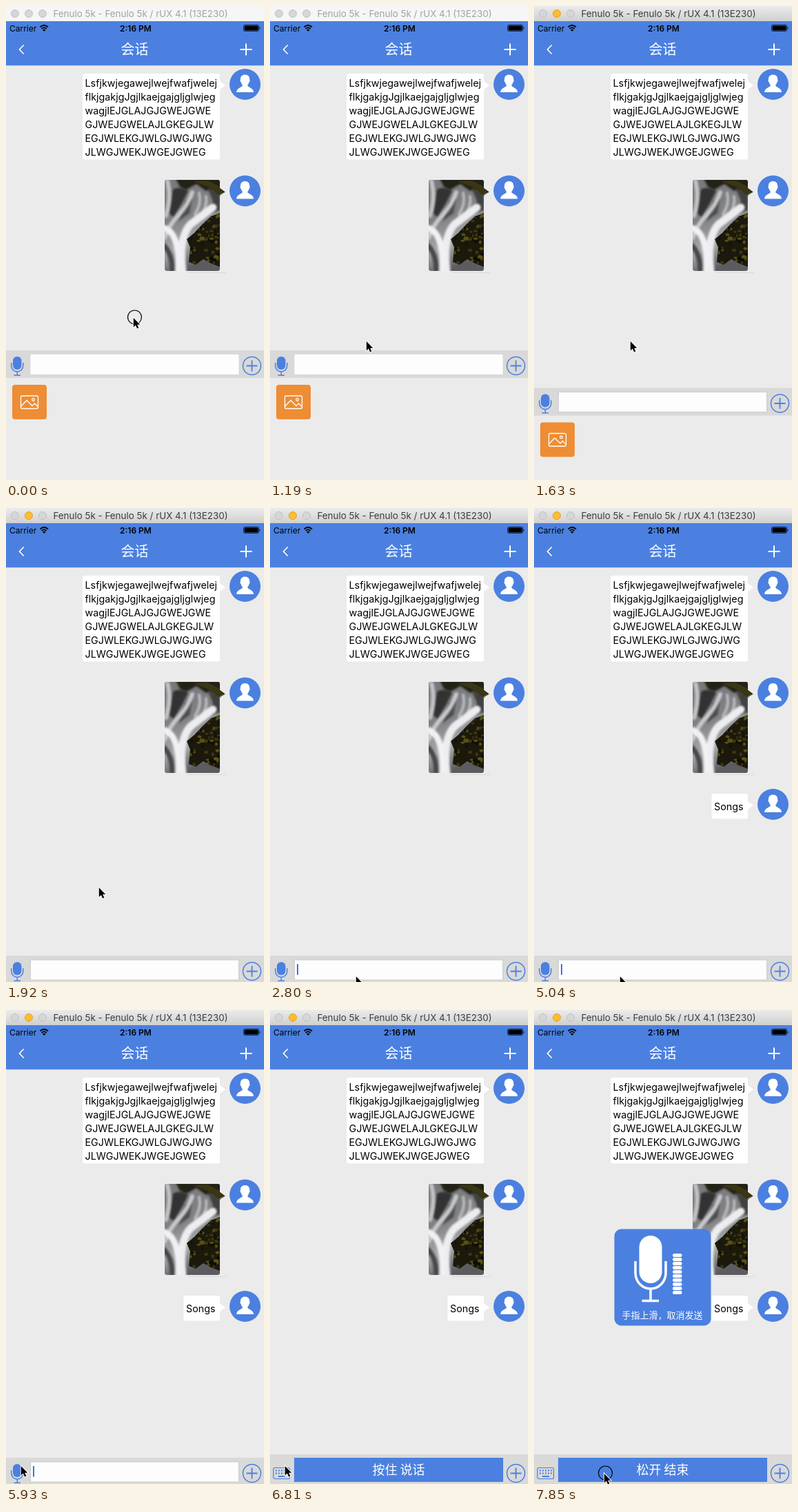
These frames come from a looping animation (374x687 px, 8000 ms). An HTML page:

```html
<!DOCTYPE html>
<html lang="zh-CN">
<head>
<meta charset="utf-8">
<title>Chat</title>
<style>
  html, body { margin: 0; width: 100%; height: 100%; overflow: hidden; background: #ebebeb; }
  svg { display: block; width: 374px; height: 687px; }
  text { font-family: Inter, "Noto Sans CJK SC", "Noto Sans CJK", sans-serif; white-space: pre; }
  .mid { text-anchor: middle; }
  .blue { fill: #4b80e0; }
  .white { fill: #fff; }
  .line { fill: none; stroke: #4b80e0; stroke-width: 1.5; }
  .wline { fill: none; stroke: #fff; }
  .msg { font-size: 14.3px; }
  .edit { font: 12px "Liberation Sans", Arial, sans-serif; }
  .cjk { font-family: "Noto Sans CJK SC", "Noto Sans CJK", sans-serif; fill: #fff; }
  .dot { fill: #d6d6d6; stroke: #c2c2c2; }
  #title { font-size: 13.4px; fill: #a2a2a2; }
  #chrome { fill: #f6f6f6; }
  .active #chrome { fill: url(#steel); }
  .active #title { fill: #3d3d3d; }
  .active #amber { fill: #fdbd2e; stroke: #e0a033; }
  .active .field { stroke: #cbcbcb; }
</style>
</head>
<body>
<svg id="stage" viewBox="0 0 374 687">
  <defs>
    <linearGradient id="steel" x2="0" y2="1">
      <stop stop-color="#ebebeb"/><stop offset="1" stop-color="#d0d0d0"/>
    </linearGradient>
    <linearGradient id="mist" x2="0.3" y2="1">
      <stop stop-color="#77787b"/><stop offset=".45" stop-color="#808184"/>
      <stop offset=".75" stop-color="#a9a9ac"/><stop offset="1" stop-color="#5c5c60"/>
    </linearGradient>
    <filter id="soft"><feGaussianBlur stdDeviation="1.500"/></filter>
    <clipPath id="photo">
      <path d="M233 252H307a3 3 0 0 1 3 3V264L317.500 269.500L310 275V381a3 3 0 0 1-3 3H233a3 3 0 0 1-3-3V255a3 3 0 0 1 3-3z"/>
    </clipPath>
    <clipPath id="cliff">
      <path d="M262 338L274 328L284 317L297 305L310 300V378L297 373L286 367L275 375L265 371L267 350z"/>
    </clipPath>
    <g id="avatar">
      <circle r="22.500" class="blue"/>
      <path class="white" d="M0-14C4.500-14 6.800-11 6.600-7C7.500-6 6.800-3.500 5.800-3C5-.5 4 1 3.500 1.500C4.500 5 12 4.500 12.500 11.500H-12.500C-12 4.500-4.500 5-3.500 1.500C-4 1-5-.5-5.800-3C-6.800-3.500-7.500-6-6.600-7C-6.800-11-4.500-14 0-14z"/>
    </g>
  </defs>

  <rect width="374" height="687" fill="#ebebeb"/>

  <!-- messages -->
  <g class="white">
    <rect x="111" y="98" width="199" height="124.500" rx="3"/>
    <path d="M309.500 108.500L318 115L309.500 121.500z"/>
  </g>
  <g id="letter"></g>
  <use href="#avatar" x="346.500" y="113.500"/>

  <g clip-path="url(#photo)">
    <rect x="230" y="252" width="90" height="132" fill="url(#mist)"/>
    <g filter="url(#soft)">
      <path d="M246 250H320V274L304 264L290 268L276 258L262 266L252 262z" fill="#232216"/>
      <path d="M242 266Q252 260 264 268L256 284L243 306L236 300z" fill="#303130"/>
      <path d="M292 264L310 270V296L296 300L300 282z" fill="#414140"/>
      <path d="M260 282L270 278L266 300L250 312z" fill="#4c4d4d"/>
    </g>
    <path d="M272 254L292 253L308 261L317 269L308 274L294 263z" fill="#3a3614"/>
    <g filter="url(#soft)" fill="none" stroke-linecap="round">
      <path d="M234 254Q240 276 232 304" stroke="#c4c4c7" stroke-width="6"/>
      <path d="M270 270Q264 288 250 303T230 336" stroke="#c9c9cc" stroke-width="6"/>
      <path d="M280 271Q284 286 274 302M290 276Q292 290 284 300" stroke="#bcbcc0" stroke-width="4"/>
      <path d="M300 292Q284 304 268 316Q250 334 256 384" stroke="#ededf0" stroke-width="11"/>
      <path d="M230 322Q252 330 250 384" stroke="#f1f1f4" stroke-width="9"/>
      <path d="M230 348Q242 362 241 386" stroke="#47474b" stroke-width="7"/>
    </g>
    <g id="rock" clip-path="url(#cliff)">
      <rect x="260" y="296" width="52" height="84" fill="#1b190c"/>
    </g>
  </g>
  <path d="M263 386.500H319" stroke="#d9d9d9"/>
  <use href="#avatar" x="346.500" y="268"/>

  <g id="reply">
    <rect x="257.500" y="414" width="52.500" height="36.500" rx="3" class="white"/>
    <path d="M309.500 425L318 431L309.500 437.500z" class="white"/>
    <text x="261" y="438" class="msg">Songs</text>
    <use href="#avatar" x="346.500" y="429.500"/>
  </g>

  <!-- input bar and its attachment panel -->
  <g id="bar">
    <g id="typing">
      <rect y="499" width="374" height="40" fill="#d9d9d9"/>
      <rect class="field" x="35.500" y="505" width="302" height="29" fill="#fdfdfd"/>
      <rect x="10" y="508" width="12.500" height="19" rx="6.200" class="blue"/>
      <path class="line" d="M7.800 517V521.500a8.500 8.500 0 0 0 17 0V517M16.300 530V535M11.500 535.300H21"/>
    </g>
    <g id="voice">
      <rect y="494" width="374" height="45" fill="#d9d9d9"/>
      <rect x="35" y="499" width="303" height="35" class="blue"/>
      <text id="hold" class="cjk mid" x="186.500" y="523" font-size="18"></text>
      <rect class="line" x="5" y="513.500" width="23.500" height="16" rx="2" style="stroke-width:1.200"/>
      <g id="keys" class="blue"></g>
    </g>
    <circle class="line" cx="356.500" cy="521.500" r="13"/>
    <path class="line" d="M348.500 521.500H364.500M356.500 513.500V529.500" style="stroke-width:1.800"/>
    <rect x="9" y="549" width="50" height="50" rx="4" fill="#ee8d34"/>
    <g class="wline" stroke-width="1.300">
      <rect x="21.500" y="565" width="25" height="18.500" rx="2"/>
      <path d="M22 580L30 571.500L38 579.500L41.500 576L46.500 581"/>
      <circle cx="39.500" cy="570.500" r="1.800"/>
    </g>
  </g>

  <g id="editor">
    <rect id="mark" x="38" y="661" height="17" fill="#c5d8f1"/>
    <text id="draft" class="edit" x="40" y="674"></text>
    <rect id="caret" y="661" width="2" height="15.500" fill="#3f73dd"/>
    <g id="hint">
      <path d="M40 641.500H83a9 9.500 0 0 1 0 19H37.500V644q0-2.500 2.500-2.500z" fill="#fff" stroke="#bdbdbd"/>
      <text class="edit" x="40" y="655.500" fill="#2f76df">Songs</text>
      <path d="M78 647.500L85 654.500M85 647.500L78 654.500" stroke="#b5b5b5"/>
    </g>
  </g>

  <!-- recording panel -->
  <g id="record">
    <rect x="116.500" y="317.500" width="140" height="140" rx="10" class="blue"/>
    <rect x="152.500" y="327" width="33" height="69" rx="16.500" class="white"/>
    <path class="wline" stroke-width="3.500" d="M147 364V381a22 23 0 0 0 44 0V364M169 404V421M156.500 421.500H181"/>
    <g id="levels" class="white"></g>
    <text class="cjk mid" x="186" y="447" font-size="13">手指上滑，取消发送</text>
  </g>

  <!-- window chrome, status and navigation -->
  <rect id="chrome" width="374" height="22"/>
  <circle class="dot" cx="13" cy="11" r="5.500"/>
  <circle class="dot" id="amber" cx="33" cy="11" r="5.500"/>
  <circle class="dot" cx="53" cy="11" r="5.500"/>
  <text id="title" class="mid" x="195" y="16">Fenulo 5k - Fenulo 5k / rUX 4.1 (13E230)</text>
  <rect y="22" width="374" height="64" class="blue"/>
  <rect y="86" width="374" height=".500" fill="#a9b6cf"/>
  <text x="5" y="36.500" font-size="12">Carrier</text>
  <path d="M49.500 30.500Q55.300 25.500 61 30.500M51.700 33Q55.300 29.800 58.800 33" fill="none" stroke="#000" stroke-width="1.700"/>
  <path d="M53 34.500Q55.300 32.800 57.600 34.500L55.300 37z"/>
  <text class="mid" x="188" y="36.500" font-size="12" font-weight="600">2:16 PM</text>
  <rect x="344.500" y="27.500" width="22" height="9" rx="2" fill="none" stroke="#000" stroke-width=".700"/>
  <rect x="345.500" y="28.500" width="20" height="7" rx="1"/>
  <path d="M367.500 30.500q2 1.600 0 3.200z"/>
  <path class="wline" stroke-width="1.600" d="M25.700 56.500L19.500 63L25.700 69.500"/>
  <text class="cjk mid" x="186.500" y="70" font-size="20" font-weight="500">会话</text>
  <path class="wline" stroke-width="2" d="M339.500 63H356.500M348 54.500V71.500"/>

  <circle id="tap" r="10" fill="none" stroke="#000" stroke-width="1.200"/>
  <path id="pointer" d="M.8 1V14.500L3.900 11.600L6.100 16.500L8.300 15.500L6.200 10.700H10.300z" stroke="#fff" stroke-width="1.800" paint-order="stroke"/>
</svg>
<script>
const LOOP = 8000, TICK = LOOP / 54;
const $ = id => document.getElementById(id);
const show = (id, on) => $(id).style.display = on ? '' : 'none';
const within = (n, a, b) => n >= a && n < b;

function add(parent, tag, attrs, text = '') {
  const el = document.createElementNS('http://www.w3.org/2000/svg', tag);
  for (const key in attrs) el.setAttribute(key, attrs[key]);
  el.textContent = text;
  return $(parent).appendChild(el);
}

['Lsfjkwjegawejlwejfwafjwelej', 'flkjgakjgJgjlkaejgajgljglwjeg', 'wagjlEJGLAJGJGWEJGWE',
 'GJWEJGWELAJLGKEGJLW', 'EGJWLEKGJWLGJWGJWG', 'JLWGJWEKJWGEJGWEG']
  .forEach((line, i) => add('letter', 'text', { x: 114.5, y: 117 + 20 * i, class: 'msg' }, line));

// mossy speckles on the rock
let seed = 7;
const random = () => (seed = seed * 16807 % 2147483647) / 2147483647;
for (let i = 0; i < 70; i++)
  add('rock', 'ellipse', {
    cx: 264 + 46 * random(), cy: 302 + 72 * random(), rx: 1 + 3 * random(), ry: 1 + 2 * random(),
    fill: ['#5a5112', '#3b360f', '#0e0d07'][i % 3]
  });

for (let i = 0; i < 10; i++)
  add('keys', 'rect', { x: 8 + i % 5 * 4, y: 516.5 + Math.floor(i / 5) * 4, width: 2, height: 2 });
add('keys', 'rect', { x: 12, y: 525, width: 10, height: 2 });

const levels = Array.from({ length: 10 }, (_, i) =>
  add('levels', 'rect', { x: 201, y: 353 + 6 * i, width: 13.5, height: 5, rx: 2.5 }));

// pointer waypoints: tick, x, y
const path = [
  [0, 184, 451], [1, 183, 454], [5, 158, 518], [8, 139, 485], [11, 139, 485], [17, 124, 678],
  [35, 124, 678], [36, 175, 580], [37, 232, 433], [38, 150, 520], [39, 60, 630], [40, 21, 660],
  [47, 21, 660], [50, 101, 671], [54, 101, 671]
];

function pointerAt(n) {
  const i = path.findIndex(p => p[0] > n);
  const [a, x0, y0] = path[i - 1], [b, x1, y1] = path[i];
  const k = (n - a) / (b - a);
  return [x0 + (x1 - x0) * k, y0 + (y1 - y0) * k];
}

function slide(n) {
  const k = Math.min(1, Math.max(0, (n - 10) / 2));
  return 150 * k ** 1.46;
}

function drawEditor(n) {
  const sent = n >= 33, voice = n >= 44;
  const typed = n === 32 ? 'Songs' : sent ? '' : 'Sdjfa'.slice(0, Math.max(0, n - 24));
  const hinted = within(n, 30, 32);
  $('draft').textContent = typed;
  const width = typed ? $('draft').getComputedTextLength() : 0;
  $('mark').setAttribute('width', width + 2);
  $('caret').setAttribute('x', 39 + width);
  show('editor', n >= 17 && !voice);
  show('mark', hinted);
  show('hint', hinted);
  show('caret', !within(n, 22, 25) && n !== 33);
  show('reply', sent);
  show('typing', !voice);
  show('voice', voice);
}

function draw(n) {
  $('stage').classList.toggle('active', n >= 9);
  $('bar').setAttribute('transform', `translate(0 ${slide(n)})`);
  drawEditor(n);

  const recording = n >= 52;
  $('hold').textContent = recording ? '松开 结束' : '按住 说话';
  show('record', recording);
  levels.forEach((bar, i) => bar.style.display = n >= 53 || i >= 5 ? '' : 'none');

  const [x, y] = pointerAt(n);
  $('pointer').setAttribute('transform', `translate(${x} ${y})`);
  $('tap').setAttribute('transform', `translate(${x + 2.5} ${y})`);
  show('tap', n < 1 || n === 9 || within(n, 17, 19) || within(n, 43, 45) || n >= 50);
}

function frame() {
  const t = performance.now() % LOOP;
  draw(Math.min(53, Math.floor((t + 18) / TICK)));
  requestAnimationFrame(frame);
}
frame();
</script>
</body>
</html>
```
